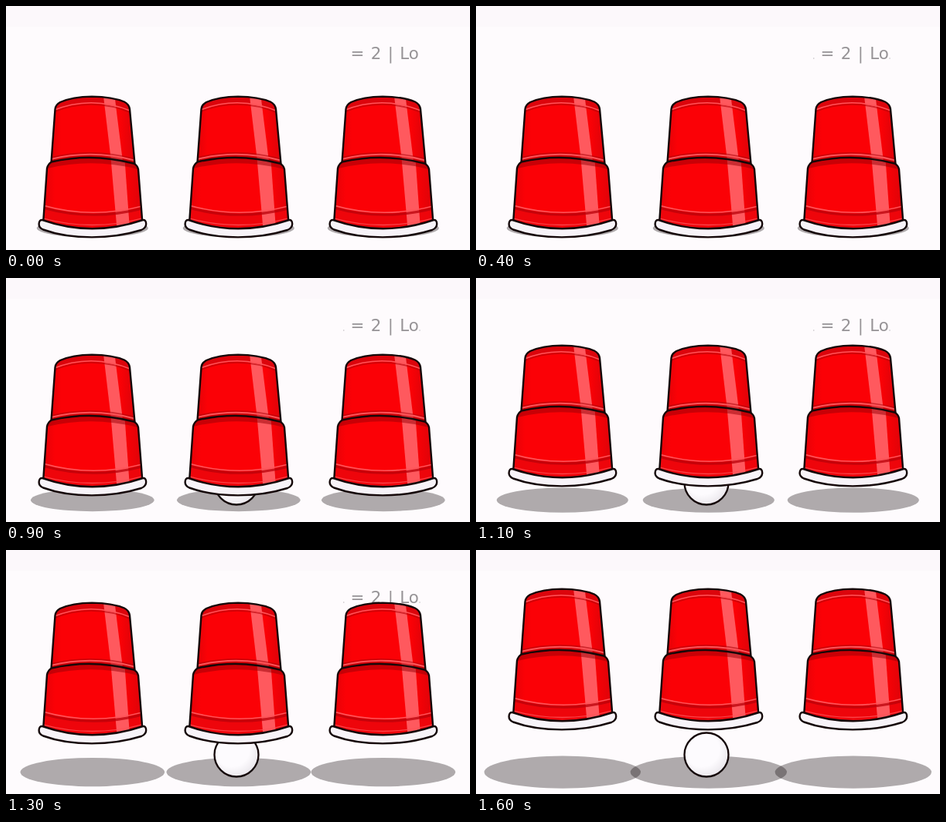
These frames come from a looping animation (600x317 px, 1.7 s). An HTML page:

```html
<!DOCTYPE html>
<html lang="en">
<head>
<meta charset="utf-8">
<title>Three cups</title>
<style>
html, body { margin: 0; width: 100%; height: 100%; overflow: hidden; background: #fefbfd; }
svg { display: block; width: 100vw; height: 100vh; }
text { font: 21.3px "DejaVu Sans", Verdana, sans-serif; word-spacing: 1.6px; fill: #969396; }
</style>
</head>
<body>
<svg viewBox="0 0 600 317">
  <defs>
    <linearGradient id="red">
      <stop offset="0" stop-color="#e40208"/>
      <stop offset=".12" stop-color="#fb0106"/>
      <stop offset=".82" stop-color="#fb0106"/>
      <stop offset="1" stop-color="#dc0309"/>
    </linearGradient>
    <radialGradient id="pearl" cx=".4" cy=".38" r=".65">
      <stop offset=".6" stop-color="#fdfbfe"/>
      <stop offset="1" stop-color="#eae7ec"/>
    </radialGradient>
    <path id="upper" d="M58.5 203L63.5 134Q64 128.5 70 125Q86 117.8 111 117.6Q138 118 153 124.5Q159 127.5 160 134L166.5 205Z"/>
    <path id="lower" d="M48 283L53 211Q54 205.5 59 202.5Q111 190.5 165 204.5Q170 207 171 212L176.5 283Q111 299 48 283Z"/>
    <clipPath id="inUpper"><use href="#upper"/></clipPath>
    <clipPath id="inLower"><use href="#lower"/></clipPath>
    <g id="cup" fill="none" stroke-linejoin="round">
      <use href="#upper" fill="url(#red)"/>
      <g clip-path="url(#inUpper)">
        <path d="M60 136Q111 115 163 137V110H60Z" fill="#dc050c"/>
        <path d="M126 117H140.5L151.5 206H136.5Z" fill="#ff595e"/>
        <path d="M60 138Q111 117 163 139" stroke="#b80008" stroke-opacity=".6" stroke-width="2"/>
        <path d="M60 136Q111 115 163 137" stroke="#ff5358" stroke-width="1.6"/>
        <path d="M56 200.5Q111 186 168 202" stroke="#a80008" stroke-opacity=".55" stroke-width="7"/>
        <path d="M56 199.5Q111 185.5 168 201" stroke="#ff5358" stroke-width="2"/>
      </g>
      <use href="#upper" stroke="#150809" stroke-width="2.4"/>
      <use href="#lower" fill="url(#red)"/>
      <g clip-path="url(#inLower)">
        <path d="M46 259Q111 278 178 260V302H46Z" fill="#ee050b"/>
        <path d="M135 192H153L160 290H143.5Z" fill="#ff595e"/>
        <path d="M53 208Q111 194 171 209" stroke="#980007" stroke-opacity=".5" stroke-width="6"/>
        <path d="M46 261.5Q111 280.5 178 262.5" stroke="#b80008" stroke-opacity=".75" stroke-width="3.2"/>
        <path d="M46 258.5Q111 277.5 178 259.5" stroke="#ff5358" stroke-width="1.6"/>
        <path d="M45 275Q111 294 179 275" stroke="#ff5358" stroke-opacity=".8" stroke-width="1.3"/>
      </g>
      <use href="#lower" stroke="#150809" stroke-width="2.4"/>
      <path d="M47 278Q111 300.5 177 278Q181 277.5 181.2 283Q181.2 288.5 175 291Q145 300.4 111 300.4Q75 300.4 48 290.5Q42.4 288 42.6 283Q43 277.5 47 278Z" fill="#f7f3f8" stroke="#150809" stroke-width="2.4"/>
    </g>
  </defs>
  <rect width="600" height="317" fill="#fefbfd"/>
  <rect width="600" height="27" fill="#fcf8fb"/>
  <text x="445.6" y="69.3">= 2 | Lo</text>
  <path id="specks" d="M436 68h1.4M534.3 68h1.4" stroke="#cbc8cb" stroke-width="1.5"/>
  <g id="shadows" fill="#0a0006" fill-opacity=".325"></g>
  <circle cx="298" cy="266" r="28.5" fill="url(#pearl)" stroke="#150809" stroke-width="2.3"/>
  <g id="cups"></g>
</svg>
<script>
const LOOP = 1700, STEP = 100;
const offsets = [0, 189, 376];
const get = id => document.getElementById(id);

function add(parent, tag, attrs) {
  const el = document.createElementNS("http://www.w3.org/2000/svg", tag);
  for (const key in attrs) el.setAttribute(key, attrs[key]);
  return parent.appendChild(el);
}

const shadows = offsets.map(x => add(get("shadows"), "ellipse", { cx: 111.8 + x, cy: 288.6 }));
offsets.forEach(x => add(get("cups"), "use", { href: "#cup", x }));

// Steady rise of 6 px per step, with two uneven jumps.
function liftAt(step) {
  if (step < 9) return 0;
  return step < 12 ? 18 + 6 * (step - 9) : 43 + 6 * (step - 12);
}

function draw(ms) {
  const step = Math.floor(ms % LOOP / STEP);
  const lift = liftAt(step);
  get("cups").setAttribute("transform", `translate(0 ${-lift})`);
  get("specks").setAttribute("opacity", step > 0 && step < 16 ? 1 : 0);
  for (const s of shadows) {
    s.setAttribute("rx", 72 + lift * 0.435);
    s.setAttribute("ry", 12.2 + lift * 0.132);
  }
}

const start = performance.now();
function tick() {
  draw(performance.now() - start);
  requestAnimationFrame(tick);
}
tick();
</script>
</body>
</html>
```
